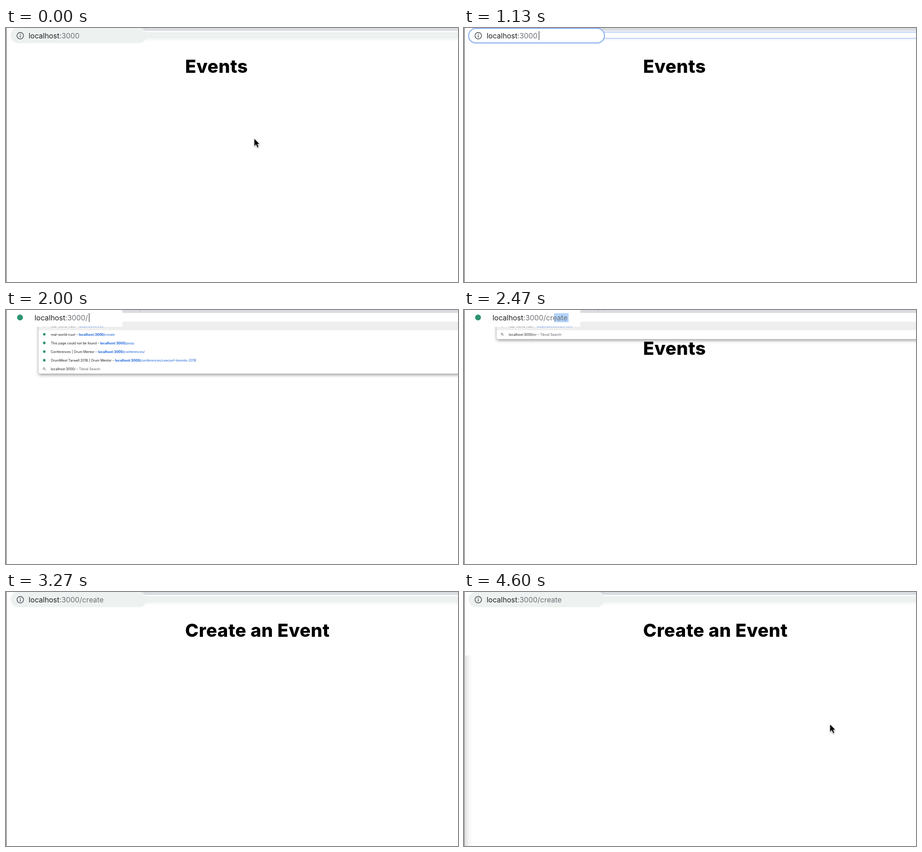
An HTML page for the animation above (5.67 s loop, 998 by 561 pixels).

```html
<!DOCTYPE html>
<html lang="en">
<head>
<meta charset="utf-8">
<title>Opening the create page</title>
<style>
  html, body { margin: 0; width: 100%; height: 100%; overflow: hidden; background: #fff; }
  svg { display: block; width: 998px; height: 561px; }
  svg svg { width: 257px; height: 37px; }
  text { white-space: pre; font-family: Inter, "Open Sans", sans-serif; }
  .title { font-size: 40px; font-weight: 800; letter-spacing: .5px; }
  .url { font-size: 15.9px; fill: #202124; }
  .row { font-size: 7.3px; fill: #1c1c1c; }
  .url .grey { fill: #6e7175; }
  .row .grey { fill: #55585c; }
  .link { fill: #1a62d8; }
  .host { font-weight: 700; }
  .menu { fill: #fff; filter: drop-shadow(0 3px 3.5px #0006); }
  .arrow { filter: drop-shadow(0 2px 1.5px #0005); }
</style>
</head>
<body>
<svg id="stage" viewBox="0 0 998 561"></svg>
<script>
const LOOP = 5670, TICK = 200 / 3;
const INSET_W = 257, INSET_H = 37, ROW_H = 19.1;
const stage = document.getElementById('stage');

const rect = (x, y, w, h, fill, more = '') =>
  `<rect x="${x}" y="${y}" width="${w}" height="${h}" fill="${fill}" ${more}/>`;
const line = (d, color, width) =>
  `<path d="${d}" fill="none" stroke="${color}" stroke-width="${width}" stroke-linecap="round"/>`;
const dot = (x, y, r) => `<circle cx="${x}" cy="${y}" r="${r}" fill="#2f9473"/>`;
const span = (cls, s) => `<tspan class="${cls}">${s}</tspan>`;

// Eased position on a quadratic curve between two times
function along(t, from, to, [a, b, c]) {
  const p = Math.min(1, Math.max(0, (t - from) / (to - from)));
  const u = p * p * (3 - 2 * p), v = 1 - u;
  return [0, 1].map(i => v * v * a[i] + 2 * u * v * b[i] + u * u * c[i]);
}

const arrow = ([x, y]) =>
  `<path class="arrow" transform="translate(${x} ${y})" stroke="#fff" stroke-width=".8"
    d="M0 0V17L4 13.4L7 20L10 18.7L7.2 12.4H12.2Z"/>`;

function beam() {
  const d = 'M228 0V28Q228 33 219.5 34.5M228 28Q228 33 236.5 34.5M224.5 14H231.5';
  return line(d, '#fff', 6.5) + line(d, '#202226', 3);
}

// Suggestion list
function row(i, [title, path]) {
  const y = 37.5 + ROW_H * i, mid = y - 3;
  const search = path === undefined;
  const icon = search
    ? `<circle cx="83.8" cy="${mid - .6}" r="2" fill="none" stroke="#555" stroke-width=".9"/>` +
      line(`M85.4 ${mid + 1}L87.4 ${mid + 3}`, '#555', 1)
    : dot(84.5, mid, 2.9);
  const tail = search
    ? span('grey', ' – Tibvol Search')
    : span('grey', ' – ') + span('link host', 'localhost:3000' + path.slice(0, 1)) +
      span('link', path.slice(1));
  return icon + `<text class="row" x="99" y="${y}">${title}${tail}</text>`;
}

function suggestions(typed) {
  const home = ['real-world-nuxt', ''];
  const create = ['real-world-nuxt', '/create'];
  const lost = ['This page could not be found', '/poop'];
  const talks = [
    ['Conferences | Orum Mentor', '/conferences/'],
    ['OrumMeet Tarwell 2018 | Orum Mentor', '/conferences/vueconf-toronto-2018']
  ];
  const search = ['localhost:3000/' + typed];
  if (!typed) return [home, create, lost, ...talks, search];
  return typed === 'c' ? [create, ...talks, search] : [create, search];
}

function menu(typed) {
  const rows = suggestions(typed);
  const bottom = 26 + ROW_H * rows.length;
  return `<rect class="menu" x="72" y="10" width="950" height="${bottom - 10}" rx="4"/>` +
    rect(72, 26, 926, 18.6, '#eee') + rows.map((r, i) => row(i, r)).join('');
}

// Browser bar at its normal size
function bar(open, focus, fill) {
  let s = rect(0, 0, 998, 26, '#fff') + rect(0, 0, 998, 6.5, '#dadce2') +
    rect(295.5, 0, 1, 3, '#a9abb0') + rect(308, 0, 2, 1, '#a9abb0');
  if (open) return s;
  s += focus
    ? rect(0, 8.5, 998, 1.3, '#8fb4f2') + rect(0, 22.2, 998, 1.3, '#8fb4f2')
    : rect(0, 9, 998, 14.5, fill);
  return s + rect(0, 25.5, 998, 1, focus ? '#dfe5f0' : '#e6e7e9');
}

// Enlarged left end of the address bar
function inset({ open, focus, fill, path, mark, caret }) {
  let s = rect(0, 0, INSET_W, INSET_H, '#fff');
  if (open) s += dot(31, 16.5, 6.5);
  else {
    s += focus
      ? rect(10.2, .8, 300, 32.2, '#fff', 'rx="16.1" stroke="#8fb4f2" stroke-width="2.4"')
      : rect(10, -.5, 300, 34, fill, 'rx="17"');
    s += `<circle cx="31.5" cy="17" r="7.2" fill="none" stroke="#5a5e63" stroke-width="1.7"/>` +
      rect(30.6, 16, 1.8, 5, '#5a5e63') + rect(30.6, 12.8, 1.8, 1.9, '#5a5e63');
  }
  if (mark) s += rect(mark[0], 7, mark[1] - mark[0], 20, '#b4d5fe');
  s += `<text class="url" x="${open ? 63 : 50}" y="22.6">localhost${span('grey', ':3000' + path)}</text>`;
  if (caret) s += rect(caret, 7, 1.2, 19.5, '#333');
  return `<svg>${s}</svg>`;
}

function draw(t) {
  const focus = t >= 800 && t < 3130;
  const open = t >= 1730 && t < 3130;
  const hover = t >= 670 && t < 800;
  const fill = hover ? '#e4e8e8' : '#edf1f0';
  const count = t < 2270 ? 0 : t < 2470 ? 1 : Math.min(6, 1 + Math.round((t - 2400) / TICK));
  const typed = 'create'.slice(0, count);
  const path = t < 1670 ? '' : t < 2270 ? '/' : '/create';

  // Selected text: the whole address, or the completed ending
  let mark = null, caret = 0;
  if (t >= 870 && t < 1130) mark = [50, 164];
  else if (open && count > 0 && count < 6) mark = [183 + 8 * count, 231];
  else if (open) caret = count ? 231 : 183;
  else if (focus && t >= 1130) caret = t < 1670 ? 165 : 170;

  let s = `<text class="title" x="395.5" y="99">${t < 3200 ? 'Events' : 'Create an Event'}</text>`;
  s += rect(0, 0, 1, 561, '#3a3a3a');
  if (t >= 4600) s += rect(0, 140, 18, 421, 'url(#shade)') + rect(0, 140, 1, 421, '#777');
  if (open) s += menu(typed);
  s += bar(open, focus, fill) + inset({ open, focus, fill, path, mark, caret });
  s += rect(0, 0, 1, INSET_H, '#3a3a3a');

  if (t < 600) s += arrow(along(t, 0, 600, [[548, 244], [260, 240], [222, 10]]));
  else if (t < 1130) {
    if (t >= 730 && t < 870) {
      const grow = (t - 730) / 70;
      s += `<circle cx="227" cy="14" r="${9 + 4 * grow}" fill="none" stroke="#e2505f"
        stroke-width="${4.5 - 2 * grow}" opacity="${1 - .4 * grow}"/>`;
    }
    s += beam();
  } else if (t >= 3800) s += arrow(along(t, 3800, 4270, [[218, 52], [480, 190], [808, 292]]));

  stage.innerHTML = `<defs><linearGradient id="shade">
    <stop stop-color="#d9d9d9"/><stop offset=".5" stop-color="#f2f2f2"/>
    <stop offset="1" stop-color="#fff"/></linearGradient></defs>` + s;
}

// The picture advances 15 times a second
const start = performance.now();
let last = -1;
function play() {
  const tick = Math.floor(((performance.now() - start) % LOOP) / TICK + .05);
  if (tick !== last) draw(Math.round(tick * TICK / 10) * 10);
  last = tick;
  requestAnimationFrame(play);
}
play();
</script>
</body>
</html>
```
